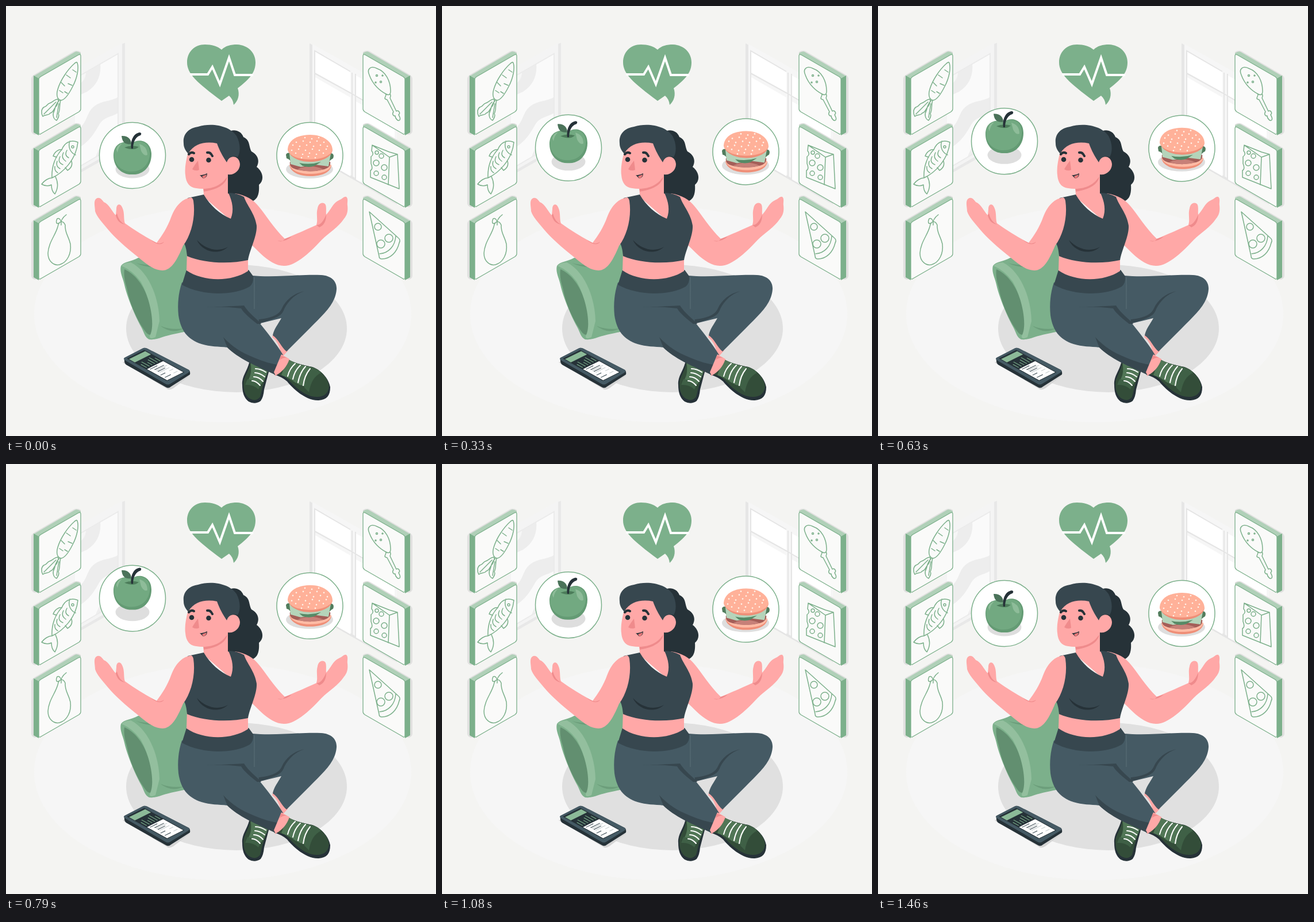
Recreate the animation shown at these times as an HTML page. Size 748 by 748 pixels, loop 1500 ms.

```html
<!DOCTYPE html>
<html lang="en">
<head>
<meta charset="utf-8">
<title>Healthy choices</title>
<style>
html, body { margin: 0; width: 100%; height: 100%; overflow: hidden; background: #f4f4f2; }
svg { display: block; width: 100vw; height: 100vh; }
.line { fill: none; stroke: #7cb08b; stroke-width: 1.5; stroke-linecap: round; stroke-linejoin: round; }
.skin { fill: #ffa8a7; }
.blush { fill: #ef8b8c; }
.dark { fill: #37474f; }
.ink { fill: #263238; }
.leg { fill: #455a64; }
.green { fill: #7cb08b; }
.lace { fill: none; stroke: #fff; stroke-width: 2; stroke-linecap: round; }
</style>
</head>
<body>
<svg viewBox="0 0 748 748" xmlns="http://www.w3.org/2000/svg">
<defs>
  <g id="box">
    <path fill="#e0e0df" d="M44 127Q44 123 48 120L118 79Q124 76 130 80V178L62 221L50 224Q44 222 44 217Z"/>
    <path fill="#b0d0b8" d="M48 122L120 80Q124 78 130 82V88L57 128Z"/>
    <path class="green" d="M48 121L57 126V225L48 220Z"/>
    <path d="M60 123L126 85Q130 83 130 87V179Q130 182 127 184L61 222Q57 225 57 220V128Q57 125 60 123Z" fill="#fafaf9" stroke="#7cb08b" stroke-width="1.3"/>
  </g>
  <g id="stack">
    <use href="#box"/><use href="#box" y="126"/><use href="#box" y="252"/>
  </g>
  <clipPath id="glass"><path d="M120 126L195 83V240L120 284Z"/></clipPath>
</defs>

<rect width="748" height="748" fill="#f4f4f2"/>
<ellipse cx="377" cy="536" rx="328" ry="188" fill="#f6f6f6"/>

<g id="windows">
  <path fill="#e8e8e8" d="M112 118L202 66L207 64V246L112 300Z"/>
  <path fill="#f4f4f4" d="M112 115L202 64V243L112 295Z"/>
  <g clip-path="url(#glass)">
    <rect x="110" y="70" width="90" height="220" fill="#fafafa"/>
    <path fill="#ededed" d="M110 100H164Q167 132 141 149Q128 156 110 160Z"/>
    <path fill="#f6f6f6" d="M110 115H139Q139 136 110 143Z"/>
    <path fill="#ededed" d="M200 155C186 167 169 163 154 174C136 187 145 211 110 222V254C140 244 151 226 163 205C171 192 187 193 200 183Z"/>
    <path fill="#efefef" d="M200 215Q168 224 153 270H200Z"/>
  </g>
  <path fill="none" stroke="#ebebeb" stroke-width="2" d="M120 126L195 83V240L120 284"/>

  <path fill="#e6e6e6" d="M528 65L538 70L680 151V345L538 264L528 259Z"/>
  <path fill="#f6f6f6" d="M533 66L680 149V340L533 257Z"/>
  <path fill="#fff" d="M538 79L599 114V150L538 116ZM538 124L599 159V296L538 261ZM609 121L676 158V194L609 156ZM609 166L676 204V338L609 302Z"/>
  <path fill="none" stroke="#e5e5e5" stroke-width="2" d="M537 263V78L599 114M537 117L599 151L621 164M602 116V299M608 118V303M537 262L676 342"/>
</g>

<use href="#stack"/>
<use href="#stack" transform="translate(751 0) scale(-1 1)"/>

<g class="line">
  <path d="M124 99C127 108 124 125 116 140C110 152 103 163 96 164C89 163 87 155 90 145C95 128 108 110 118 101Q123 96 124 99ZM116 111L122 115M105 120L112 125M108 135L115 138M96 133L102 139M93 147L99 151M102 149L107 152"/>
  <path d="M91 162C84 162 81 168 76 169C71 170 72 175 66 176C61 179 61 187 64 192C68 188 75 191 77 186C82 186 83 179 86 176C90 172 91 167 91 162M93 164C85 172 86 177 84 182C81 187 81 196 88 199C91 195 93 191 91 187C95 180 92 173 95 164M66 188L87 167M88 194L92 170"/>

  <path d="M125 237C113 232 102 237 97 250C86 261 79 279 80 299C98 291 122 268 125 237ZM80 299C74 299 66 304 62 310Q71 315 79 311Q79 322 85 327C91 317 91 307 86 297M111 235C107 246 113 256 121 259M97 250C92 249 85 253 82 261L88 263M114 270Q117 280 107 286Q104 282 103 281"/>
  <circle cx="116" cy="245" r="2"/>
  <path d="M106 251Q101 260 109 264M100 255Q95 264 104 270M94 262Q89 272 99 276M89 270Q86 279 94 283M85 279Q84 287 90 290"/>

  <path d="M90 384C86 399 74 411 73 430C73 445 84 452 93 450C107 446 114 430 112 414C109 400 102 395 103 381C99 372 92 374 90 384ZM96 381Q94 371 105 363M94 376C88 382 86 376 89 370Q94 368 96 376"/>

  <path d="M632 120C627 109 635 103 646 109C660 114 669 130 669 148C669 154 666 156 661 153C651 148 638 137 632 120ZM661 153C661 160 657 159 660 162L663 163L674 184C671 188 674 192 677 191C677 196 683 202 685 198C687 195 684 192 683 189C687 186 682 180 679 183L668 160Q670 156 668 153"/>
  <circle cx="645" cy="121" r="1.5"/><circle cx="652" cy="132" r="1.5"/><circle cx="643" cy="133" r="1"/><circle cx="655" cy="121" r="1"/>

  <path d="M637 242L667 254L681 258L684 318L634 298V286Q639 284 635 274V262Q641 258 636 252ZM637 242L667 263L665 311M667 263L681 258"/>
  <circle cx="653" cy="261" r="4"/><circle cx="644" cy="273" r="5"/><circle cx="658" cy="281" r="5"/><circle cx="644" cy="291" r="4"/><circle cx="658" cy="298" r="4"/><circle cx="645" cy="255" r="3"/>

  <path d="M632 358L682 403Q687 407 684 412C680 429 668 440 654 440Q649 440 649 435ZM650 431C665 430 677 418 678 400"/>
  <circle cx="647" cy="384" r="6"/><circle cx="666" cy="404" r="7"/><circle cx="652" cy="414" r="7"/>
</g>

<g id="heart">
  <path class="green" d="M375 76C382 69 391 67 402 67C421 68 434 81 434 98C434 115 425 126 403 143C407 154 404 165 396 172Q395 162 388 156L375 165C332 133 315 118 315 98C315 80 328 67 346 67C358 67 368 70 375 76Z"/>
  <path d="M320 119H351L359 106L372 136L388 90L398 120H430" fill="none" stroke="#fff" stroke-width="4"/>
</g>

<ellipse cx="401" cy="561" rx="192" ry="111" fill="#e0e0e0"/>

<g id="cushion">
  <path class="green" d="M200 452C205 444 218 445 230 438C258 440 285 432 314 409L340 450L320 565C300 569 284 572 272 576Q258 581 249 580C242 577 240 568 236 560C222 535 210 503 206 485C204 474 197 463 200 452Z"/>
  <path fill="#628f70" d="M206 458C224 466 240 485 249 515C255 534 259 550 256 566Q251 577 243 567C228 547 215 518 210 490Q204 472 206 458Z"/>
  <path fill="#93bf9e" d="M201 452Q206 446 217 446C247 461 266 505 267 548L260 576Q249 581 250 574C261 554 249 504 234 479Q220 460 201 452Z"/>
  <path fill="#6c9e7b" d="M226 447Q257 455 288 446Q257 462 226 447ZM268 556Q285 564 309 561Q289 572 268 556Z"/>
</g>

<g id="phone">
  <path fill="#d5d5d5" d="M203 620L282 667Q286 668 291 665L320 643L240 598Z"/>
  <path class="ink" d="M206 612L239 595Q242 594 246 596L318 633Q321 635 320 641L287 662Q283 666 278 663L209 624Q205 621 206 612Z"/>
  <path fill="#455a64" d="M206 612L239 595Q242 594 246 596L318 633Q321 635 317 638L286 657Q282 660 277 657L208 617Q203 614 206 612Z"/>
  <g transform="matrix(1.17 -.58 .92 .51 205 613)">
    <rect x="2" y="3" width="26" height="76" class="ink"/>
    <rect x="3" y="6" width="24" height="11" fill="#8cba98"/>
    <rect x="3" y="40" width="24" height="38" fill="#fff"/>
    <path stroke="#7cb08b" d="M5 26V37M9 22V37M13 28V37M17 24V37M21 21V37M25 27V37"/>
    <path stroke="#37474f" stroke-width="1.2" d="M5 43H16M8 48H22M8 54H19M5 63H12M5 71H14"/>
    <path stroke="#bbc4c5" d="M8 51H24M8 57H23M18 63H24M18 71H24"/>
  </g>
</g>

<g id="shoes">
  <path class="ink" d="M424 616C421 634 410 643 411 659C411 672 414 682 422 688Q433 694 443 687Q448 680 449 667L459 629Z"/>
  <path fill="#334d39" d="M425 618C424 634 414 644 413 656C413 668 416 678 424 683Q435 689 442 680L447 660L457 631Z"/>
  <path fill="#517656" d="M425 618Q433 626 448 628L456 632Q453 647 443 659Q432 653 421 651Q429 639 425 618Z"/>
  <path fill="#3f6046" d="M420 649Q432 650 443 659L439 667Q430 658 416 659Z"/>
  <path class="lace" d="M434 631Q443 631 452 637M433 638Q441 638 450 645M431 645Q440 645 447 653M428 652Q435 652 442 660"/>
</g>

<g id="legs">
  <path class="skin" d="M465 569L491 599L482 609Q493 614 496 618L468 644L466 625L478 603Q474 584 463 576Z"/>
  <path class="leg" d="M428 469C470 473 514 466 548 468C566 469 576 479 575 493C573 520 550 538 529 560L488 601C479 594 474 579 464 573C466 562 473 554 479 543L438 553L410 510Z"/>
  <path class="dark" d="M519 496C501 502 490 515 484 527C480 538 475 542 438 553L434 546C460 543 474 539 480 526C486 512 500 500 519 496Z"/>
  <path class="leg" d="M306 481C300 499 298 518 300 538C304 565 316 580 340 588C355 593 370 592 385 594C402 611 438 626 470 642Q472 620 482 607C470 587 455 569 440 550L434 470Z"/>
  <path class="dark" d="M378 576C392 592 410 603 430 611C448 619 464 623 474 624Q471 632 470 642C436 627 402 612 385 594Z"/>
  <path class="dark" d="M347 524Q382 523 414 521C421 533 434 542 444 553L437 553C426 544 415 536 409 526Q377 522 347 524Z"/>
  <path d="M432 472V527" stroke="#5b6e77" fill="none"/>
  <path class="dark" d="M314 459C342 475 393 478 422 459L430 470Q431 482 424 488C396 504 342 505 306 485Z"/>
</g>

<g id="shoe2">
  <path class="ink" d="M486 612C498 620 515 625 533 628C550 634 562 650 564 663C564 678 558 685 544 686C523 687 500 667 489 653Q480 645 466 641Z"/>
  <path fill="#334d39" d="M486 612C498 620 515 625 533 628C550 634 561 650 562 661C561 674 553 680 541 680C520 680 501 661 491 650Q484 642 467 640Z"/>
  <path fill="#517656" d="M486 612C500 621 516 625 532 629Q526 639 521 662Q507 659 493 648L479 642Q485 628 486 612Z"/>
  <path fill="#3f6046" d="M531 628Q544 632 548 638Q531 646 527 672L519 664Q520 644 531 628Z"/>
  <path class="skin" d="M479 606L493 614Q487 633 469 643L466 637Z"/>
  <path class="blush" d="M478 608L489 612Q482 611 476 616Z"/>
  <path class="lace" d="M503 622Q493 631 490 644M512 625Q502 634 499 649M521 627Q511 638 508 655M529 631Q519 643 517 660"/>
</g>

<g id="body">
  <path class="ink" d="M386 220C394 213 409 216 413 228C425 233 422 244 427 253C440 260 441 271 436 280C447 288 450 303 440 311C441 326 438 335 430 339C413 337 402 328 386 327Z"/>
  <path class="skin" d="M398 326C418 329 430 337 439 348C452 363 466 387 485 405C502 398 522 389 540 381C543 371 539 363 542 352C543 345 548 341 553 343C559 346 556 355 557 363C565 355 569 342 579 338C585 336 587 331 592 332C596 336 593 342 594 347C595 355 594 363 588 370C578 385 561 395 549 407C534 423 517 440 500 448C488 454 475 453 463 446C449 438 438 426 424 412Z"/>
  <path class="blush" d="M540 381Q549 382 557 363Q557 380 545 385ZM472 408Q480 412 485 405L497 401Q486 411 472 408Z"/>
  <path class="skin" d="M315 428C343 445 390 445 421 426L421 461C393 480 343 480 314 460Z"/>
  <path class="skin" d="M343 302L344 332L391 373L409 334L386 326V284Z"/>
  <path class="blush" d="M343 316Q370 314 385 297Q381 317 344 323Z"/>
  <path class="dark" d="M316 334L344 328C355 347 372 362 391 370C397 355 394 341 387 325Q401 325 414 332C419 347 433 361 436 382C437 400 424 424 421 442C390 449 345 448 315 435C314 425 313 417 308 410Z"/>
  <path class="ink" d="M332 407C342 429 371 434 386 419C370 428 349 425 332 407Z"/>
  <path class="skin" d="M322 333C304 336 294 350 287 368C281 385 271 400 262 412C245 403 225 391 207 378C204 371 207 360 202 350C198 342 192 345 192 353L191 364C183 356 180 345 170 341C166 335 161 331 156 336C152 341 155 350 155 357C158 367 168 377 176 387C191 405 210 421 230 437C243 448 257 460 272 460C288 460 298 441 308 417C323 397 330 366 326 339Q325 334 322 333Z"/>
  <path class="blush" d="M191 364Q194 378 207 380Q196 375 193 361ZM252 407L262 412Q269 415 275 410Q268 420 252 407Z"/>
</g>

<g id="head">
  <path class="skin" d="M321 239C315 260 310 279 312 294C313 307 319 316 331 317C354 321 378 313 386 293C397 295 407 286 407 275C406 262 394 258 385 267L370 230Z"/>
  <path class="dark" d="M309 239C307 221 320 212 334 210C359 202 390 209 401 226C407 237 409 252 403 263C395 259 387 263 384 272C378 263 372 253 367 239C347 235 327 239 317 257C312 251 309 246 309 239Z"/>
  <path class="blush" d="M334 269Q327 278 324 284Q330 288 336 285Z"/>
  <circle class="ink" cx="323" cy="267" r="4.3"/>
  <circle class="ink" cx="352.500" cy="268" r="4.3"/>
  <path d="M318 258Q322 253 327 256M350 255Q356 254 359 261" fill="none" stroke="#263238" stroke-width="4" stroke-linecap="round"/>
  <path class="ink" d="M337 294Q343 295 350 291Q350 299 343 300Z"/>
  <path fill="#e87879" d="M341 296L349 293Q348 299 343 300Z"/>
</g>

<g id="burger">
  <circle cx="528.5" cy="260" r="57.5" fill="#fff" stroke="#7cb08b" stroke-width="1.5"/>
  <ellipse cx="528" cy="284" rx="41" ry="16" fill="#dedede"/>
  <path fill="#ef8f78" d="M493 277H566C565 289 550 296 529 296C508 296 495 288 493 277Z"/>
  <path fill="#ffbba5" d="M493 276H566C564 287 549 292 529 292C510 292 496 286 493 276Z"/>
  <path fill="#a45e58" d="M494 271H564Q566 280 554 284Q529 291 504 284Q492 281 494 271Z"/>
  <path fill="#c78078" d="M507 284Q529 274 552 284Q529 291 507 284Z"/>
  <path fill="#527d5d" d="M487 259Q488 254 495 256H565Q572 257 569 265Q563 268 561 273L497 274Q494 266 488 265Z"/>
  <path fill="#b5d4ba" d="M493 257H565L561 279L538 276L513 280L495 275Z"/>
  <path fill="#568a66" d="M510 273Q529 277 548 271L537 278Q527 282 516 278Z"/>
  <path fill="#ef8f78" d="M490 248C491 261 507 271 529 271C551 271 567 262 568 250Z"/>
  <path fill="#ffb199" d="M490 249C491 233 508 224 529 224C551 224 567 235 568 250C566 260 549 267 529 267C508 267 491 260 490 249Z"/>
  <g id="seeds" fill="#fff3e9"></g>
</g>

<g id="disc">
  <circle cx="220" cy="260" r="57.5" fill="#fff" stroke="#7cb08b" stroke-width="1.5"/>
  <ellipse cx="220" cy="284" rx="29.500" ry="15.500" fill="#dedede"/>
</g>
<g id="apple">
  <path fill="#649b74" d="M219 239C230 229 253 234 253 258C253 280 238 294 220 293C201 294 187 280 187 260C187 239 204 233 219 239Z"/>
  <path fill="#72a981" d="M219 239C230 231 250 235 250 256C250 276 236 288 219 288C202 289 188 276 188 259C189 239 204 234 219 239Z"/>
  <path fill="#8ebc99" d="M232 240Q246 244 246 259Q240 262 235 252ZM192 250Q194 241 202 239Q195 246 194 255Z"/>
  <path fill="#4c7c5a" d="M206 246Q218 241 231 245Q223 253 206 246Z"/>
  <path class="ink" d="M218 248C216 234 222 221 233 220Q237 221 234 225C226 227 221 236 221 248Z"/>
  <path id="leaf" fill="#4b735a" d="M218 240C207 242 202 236 201 226C211 225 218 231 218 240Z"/>
</g>
</svg>
<script>
const LOOP = 1500, STEPS = 36, LAST = STEPS - 1;
const RISE = 28.8;
const get = id => document.getElementById(id);
const [disc, apple, leaf, burger] = ["disc", "apple", "leaf", "burger"].map(get);

const rows = [[229, 520, 3], [235, 505, 5], [242, 499, 6], [249, 497, 6], [256, 504, 5], [262, 514, 3]];
get("seeds").innerHTML = rows.map(([y, x, n], r) =>
  Array.from({ length: n }, (_, i) =>
    `<circle cx="${x + i * 12}" cy="${y + (i + r) % 2 * 2}" r="1.3"/>`).join("")).join("");

const lift = (el, d) => el.setAttribute("transform", `translate(0 ${-d.toFixed(2)})`);

// Straight rise and fall, stepped at 24 pictures a second
function draw(ms) {
  const step = Math.min(LAST, Math.floor((ms % LOOP + 4) * STEPS / LOOP));
  const up = RISE * (1 - Math.abs(step * 2 / LAST - 1));
  lift(disc, up);
  lift(apple, up * 1.5);
  lift(leaf, up * 0.06);
  lift(burger, up * 0.5);
}

const start = performance.now();
function tick() {
  draw(performance.now() - start);
  requestAnimationFrame(tick);
}
tick();
</script>
</body>
</html>
```
